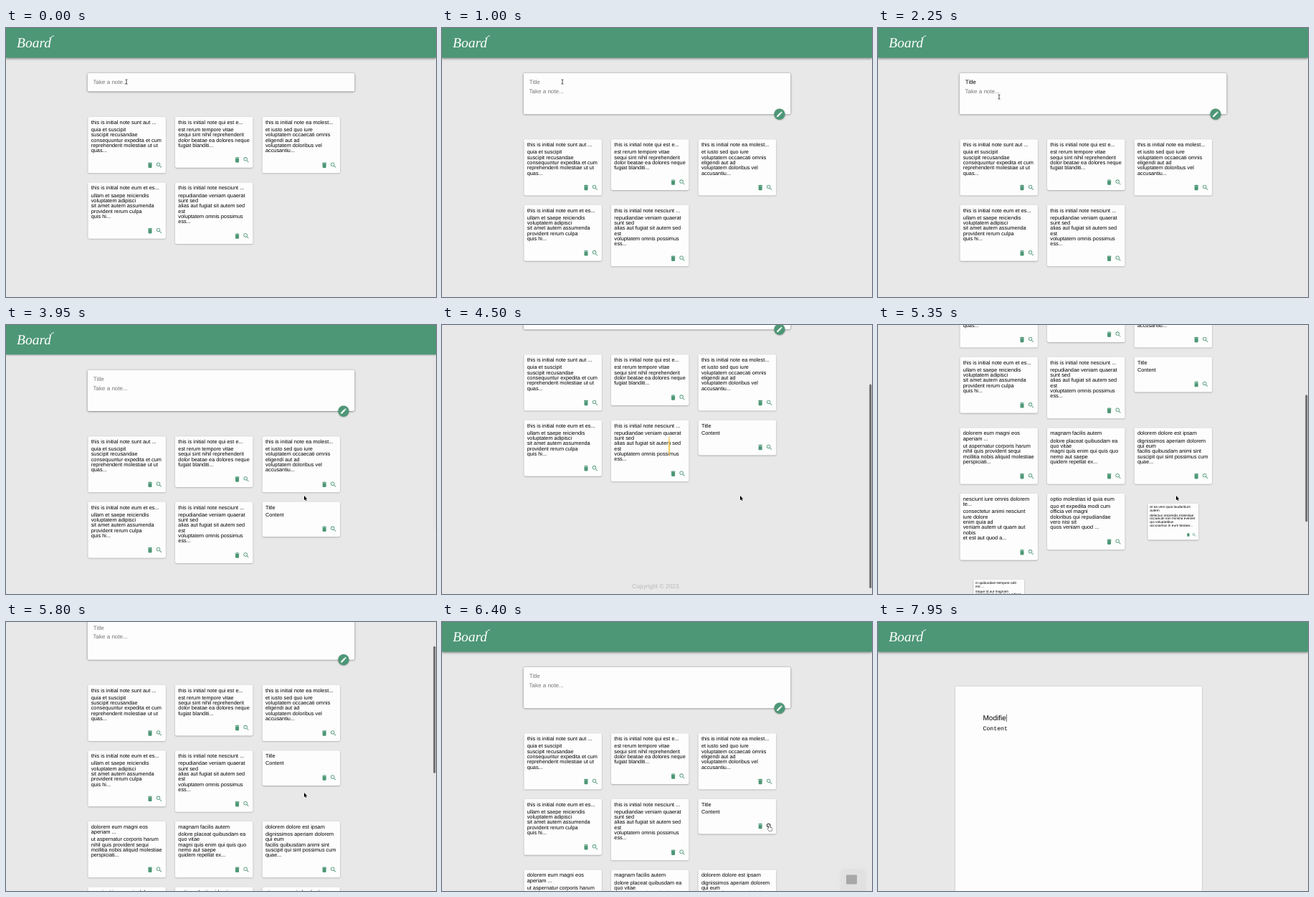
These frames come from a looping animation (600 by 375 pixels, 8 s). An HTML page with a canvas:

```html
<!DOCTYPE html>
<html lang="en">
<head>
<meta charset="utf-8">
<title>Board</title>
<style>
html, body { margin: 0; width: 100%; height: 100%; overflow: hidden; background: #e8e8e8; }
canvas { display: block; width: 600px; height: 375px; }
</style>
</head>
<body>
<canvas id="stage"></canvas>
<script>
const LOOP = 8000, W = 600, H = 375;
const GREEN = '#4d9776', PAPER = '#fdfdfd', GRAY = '#757575';
const SANS = '"Liberation Sans", Arial, sans-serif';
const canvas = document.getElementById('stage');
const ctx = canvas.getContext('2d');
const dpr = window.devicePixelRatio || 1;
canvas.width = W * dpr;
canvas.height = H * dpr;

// title, body, time of appearance
const notes = [
  ['this is initial note sunt aut ...', 'quia et suscipit\nsuscipit recusandae\nconsequuntur expedita et cum\nreprehenderit molestiae ut ut\nquas...'],
  ['this is initial note qui est e...', 'est rerum tempore vitae\nsequi sint nihil reprehenderit\ndolor beatae ea dolores neque\nfugiat blanditi...'],
  ['this is initial note ea molest...', 'et iusto sed quo iure\nvoluptatem occaecati omnis\neligendi aut ad\nvoluptatem doloribus vel\naccusantiu...'],
  ['this is initial note eum et es...', 'ullam et saepe reiciendis\nvoluptatem adipisci\nsit amet autem assumenda\nprovident rerum culpa\nquis hi...'],
  ['this is initial note nesciunt ...', 'repudiandae veniam quaerat\nsunt sed\nalias aut fugiat sit autem sed\nest\nvoluptatem omnis possimus\ness...'],
  ['Title', 'Content', 3200],
  ['dolorem eum magni eos\naperiam ...', 'ut aspernatur corporis harum\nnihil quis provident sequi\nmollitia nobis aliquid molestiae\nperspiciati...', 4800],
  ['magnam facilis autem', 'dolore placeat quibusdam ea\nquo vitae\nmagni quis enim qui quis quo\nnemo aut saepe\nquidem repellat ex...', 4800],
  ['dolorem dolore est ipsam', 'dignissimos aperiam dolorem\nqui eum\nfacilis quibusdam animi sint\nsuscipit qui sint possimus cum\nquae...', 4860],
  ['nesciunt iure omnis dolorem\nte...', 'consectetur animi nesciunt\niure dolore\nenim quia ad\nveniam autem ut quam aut\nnobis\net est aut quod a...', 4890],
  ['optio molestias id quia eum', 'quo et expedita modi cum\nofficia vel magni\ndoloribus qui repudiandae\nvero nisi sit\nquos veniam quod ...', 4800],
  ['et ea vero quia laudantium\nautem', 'delectus reiciendis molestiae\noccaecati non minima eveniet\nqui voluptatibus\naccusamus in eum beatae...', 5300],
  ['in quibusdam tempore odit\nest ...', 'itaque id aut magnam\npraesentium quia et ea odit et\nea voluptas et\nsapiente quia nihil amet...', 5300],
  ['dolorum ut in voluptas mollitia\n...', 'aut dicta possimus sint\nmollitia voluptas commodi\nquo doloremque\niste corrupti reiciendis...', 5360],
  ['voluptatem eligendi optio', 'fuga et accusamus dolorem\nperferendis illo voluptas\nnon doloremque neque facere\nad qui dolorum...', 5390],
  ['eveniet quod temporibus', 'reprehenderit quos placeat\nvelit minima officia dolores\nimpedit repudiandae molestiae\nnam\nvoluptas...', 5300]
].map(([title, body, born = -1e4], i) => {
  title = title.split('\n');
  body = body.split('\n');
  return { title, body, born, x: 114.4 + i % 3 * 121.6, h: 34.1 + 7.33 * (title.length + body.length) };
});
let rowTop = 155.3;
for (let i = 0; i < notes.length; i += 3) {
  const row = notes.slice(i, i + 3);
  row.forEach(n => n.y = rowTop);
  rowTop += Math.max(...row.map(n => n.h)) + 13.4;
}

const icons = {
  trash: 'M6 19c0 1.1.9 2 2 2h8c1.1 0 2-.9 2-2V7H6v12zM19 4h-3.5l-1-1h-5l-1 1H5v2h14V4z',
  search: 'M15.5 14h-.79l-.28-.27A6.47 6.47 0 0 0 16 9.5 6.5 6.5 0 1 0 9.5 16c1.61 0 3.09-.59 4.23-1.57l.27.28v.79l5 4.99L20.49 19l-4.99-5zm-6 0C7.01 14 5 11.99 5 9.5S7.01 5 9.5 5 14 7.01 14 9.5 11.99 14 9.5 14z',
  pencil: 'M3 17.25V21h3.75L17.81 9.94l-3.75-3.75L3 17.25zM20.71 7.04a1 1 0 0 0 0-1.41l-2.34-2.34a1 1 0 0 0-1.41 0l-1.83 1.83 3.75 3.75 1.83-1.83z'
};
for (const k in icons) icons[k] = new Path2D(icons[k]);
const arrow = new Path2D('M0 0V6.2L1.4 4.9 2.4 7.1 3.4 6.7 2.4 4.5H4.3Z');
const hand = new Path2D('M-.8-3.2Q0-4 .7-3.2V-.8L3.2 0Q3.8 .3 3.6 1.4L3 4.5H-.8L-3 1.3Q-2.6 .3-.8 1.3Z');

const scrollKeys = [[3950, 0], [4100, 25], [4250, 85], [4380, 114], [4850, 114], [5050, 244], [5150, 228],
  [5300, 202], [5600, 202], [5700, 140], [5800, 68], [5900, 18], [6000, 0]];
const mouseKeys = [[1750, 168, 75], [1900, 169, 96], [2780, 169, 96], [3050, 471, 121], [3350, 471, 121],
  [3750, 416, 238], [6020, 416, 238], [6330, 457, 287], [6650, 457, 287], [7150, 165, 134]];

const clamp = v => Math.max(0, Math.min(1, v));
const smooth = p => p * p * (3 - 2 * p);
const span = (t, a, b) => clamp((t - a) / (b - a));
const during = (t, a, b) => t >= a && t < b;

function track(keys, t, col, ease = p => p) {
  const i = keys.findIndex(k => k[0] > t);
  if (i === 0) return keys[0][col];
  if (i < 0) return keys[keys.length - 1][col];
  const a = keys[i - 1], b = keys[i];
  return a[col] + (b[col] - a[col]) * ease(span(t, a[0], b[0]));
}

function text(s, x, y, size, color = '#000', family = SANS, style = '') {
  ctx.font = `${style} ${size}px ${family}`;
  ctx.fillStyle = color;
  ctx.fillText(s, x, y);
  return ctx.measureText(s).width;
}

function box(x, y, w, h, r, color, shadow, blur = 2, drop = .6) {
  ctx.save();
  if (shadow) {
    ctx.shadowColor = shadow;
    ctx.shadowBlur = blur * dpr;
    ctx.shadowOffsetY = drop * dpr;
  }
  ctx.fillStyle = color;
  ctx.beginPath();
  ctx.roundRect(x, y, w, h, r);
  ctx.fill();
  ctx.restore();
}

function at(x, y, scale, draw) {
  ctx.save();
  ctx.translate(x, y);
  ctx.scale(scale, scale);
  draw();
  ctx.restore();
}

function icon(name, x, y, color, size = 10) {
  at(x, y, size / 24, () => {
    ctx.translate(-12, -12);
    ctx.fillStyle = color;
    ctx.fill(icons[name]);
  });
}

function header() {
  box(0, -10, W, 51.5, 0, GREEN, 'rgba(0,0,0,.4)', 3, 1);
  text('Board', 15, 27, 19.5, '#fff', '"Liberation Serif", "Times New Roman", serif', 'italic');
  ctx.strokeStyle = '#fff';
  ctx.lineWidth = .9;
  ctx.beginPath();
  ctx.moveTo(62, 15);
  ctx.quadraticCurveTo(63.5, 10.5, 67, 10.8);
  ctx.stroke();
}

function form(t, open) {
  box(113.8, 63, 372.6, 25.6 + 31.6 * open, 2, PAPER, 'rgba(0,0,0,.6)', 2.4, .4);
  const sent = t >= 3150;
  const typed = (word, start, gap) => sent ? '' : word.slice(0, Math.max(0, Math.floor((t - start) / gap) + 1));
  const title = typed('Title', 1150, 120), content = typed('Content', 2300, 70);
  ctx.globalAlpha = open;
  text(title || 'Title', 121.8, 78, 8, title ? '#000' : GRAY);
  ctx.globalAlpha = 1;
  text(content || 'Take a note...', 121.6, 78 + 12.7 * open, 8, content ? '#000' : GRAY);
  if (open > 0) at(471, 120.2, open, () => {
    box(-7.6, -7.6, 15.2, 15.2, 7.6, GREEN, 'rgba(0,0,0,.4)', 2, .5);
    icon('pencil', 0, 0, '#fff');
  });
}

function card(n, t, shift) {
  if (t < n.born) return;
  const scale = 1 - .55 * (1 - span(t, n.born, n.born + 250)) ** 2;
  at(n.x + 54.25, n.y - shift + n.h / 2, scale, () => {
    ctx.translate(-54.25, -n.h / 2);
    box(0, 0, 108.5, n.h, 2, PAPER, 'rgba(0,0,0,.32)');
    n.title.forEach((s, i) => text(s, 4.3, 9.9 + 7.33 * i, 7.4));
    const top = 12.7 + 7.33 * n.title.length;
    n.body.forEach((s, i) => text(s, 4.3, top + 7.33 * i, 7.33));
    const hover = n === notes[5] && t >= 6320;
    icon('trash', 86.6, n.h - 11, GREEN);
    icon('search', 99.2, n.h - 11, hover ? '#000' : GREEN);
  });
}

function coin(t) {
  const start = during(t, 4350, 4800) ? 4350 : during(t, 4950, 5300) ? 4950 : 0;
  if (!start) return;
  const angle = 66 * ((t - start) / 1000) ** 2;
  ctx.fillStyle = '#f7c948';
  ctx.beginPath();
  ctx.ellipse(317, 168.8, 14 * Math.abs(Math.cos(angle)), 14, 0, 0, 7);
  ctx.fill();
}

function board(t) {
  const scroll = track(scrollKeys, t, 1);
  const open = smooth(span(t, 100, 550));
  const height = t < 4800 ? 489 : t < 5300 ? 577 : 786;
  const shift = 31.2 * (1 - open);
  const scrolled = draw => at(0, -scroll, 1, draw);
  scrolled(() => {
    header();
    form(t, open);
    text('Copyright ⓒ 2023'.replace('ⓒ', '©'), 265.3, height - 8, 8.4, '#b9b9b9');
    notes.slice(0, 6).forEach(n => card(n, t, shift));
  });
  coin(t);
  scrolled(() => notes.slice(6).forEach(n => card(n, t, shift)));

  ctx.globalAlpha = Math.min(span(t, 3950, 4000), 1 - span(t, 6100, 6300));
  const thumb = 371 * H / height;
  box(596.3, Math.min(2 + 371 * scroll / height, 367 - thumb), 3, thumb, 1.5, '#6c6c6c');
  ctx.globalAlpha = 1;
}

function editor(t) {
  header();
  box(108, 90, 344, 320, 2, PAPER, 'rgba(0,0,0,.3)');
  const typing = t >= 7450;
  const count = [7500, 7600, 7650, 7750, 7800, 7900, 7950].filter(k => t >= k).length;
  if (during(t, 7250, 7450)) box(146.5, 128, 19, 11.5, 0, '#b3d7ff');
  const w = text(typing ? 'Modifie'.slice(0, count) : 'Title', 146.5, 137.2, 10);
  if (typing) box(146.9 + w, 128.5, .7, 10.5, 0, '#444');
  text('Content', 146.5, 150.6, 8.2, '#000', '"Liberation Mono", "Courier New", monospace');
}

function badge(t) {
  ctx.globalAlpha = Math.min(span(t, 6250, 6400), 1 - span(t, 6500, 6700));
  box(556, 344, 36, 40, 8, '#e1e1e1', 'rgba(225,225,225,.9)', 5, 0);
  box(564, 352.5, 15, 13, 1, '#a8a8a8');
  ctx.globalAlpha = 1;
}

function pointer(t) {
  if (during(t, 1100, 1740) || during(t, 2300, 2770) || t >= 7450) return;
  const beam = t < 2840 || t >= 7080;
  const finger = during(t, 3010, 3380) || during(t, 6310, 6500);
  at(track(mouseKeys, t, 1, smooth), track(mouseKeys, t, 2, smooth), 1, () => {
    ctx.lineJoin = 'round';
    if (beam) {
      ctx.strokeStyle = '#222';
      ctx.lineWidth = .8;
      ctx.stroke(new Path2D('M-1.5-3.2Q0-3.2 0-2.4Q0-3.2 1.5-3.2M0-2.6V2.6M-1.5 3.2Q0 3.2 0 2.4Q0 3.2 1.5 3.2'));
      return;
    }
    const shape = finger ? hand : arrow;
    ctx.strokeStyle = finger ? '#000' : '#fff';
    ctx.fillStyle = finger ? '#fff' : '#000';
    ctx.lineWidth = .8;
    ctx.stroke(shape);
    ctx.fill(shape);
  });
}

function frame(now) {
  const t = now % LOOP;
  ctx.setTransform(dpr, 0, 0, dpr, 0, 0);
  ctx.textRendering = 'geometricPrecision';
  ctx.fillStyle = '#e8e8e8';
  ctx.fillRect(0, 0, W, H);
  (t < 6500 ? board : editor)(t);
  badge(t);
  pointer(t);
  requestAnimationFrame(frame);
}
requestAnimationFrame(frame);
</script>
</body>
</html>
```
